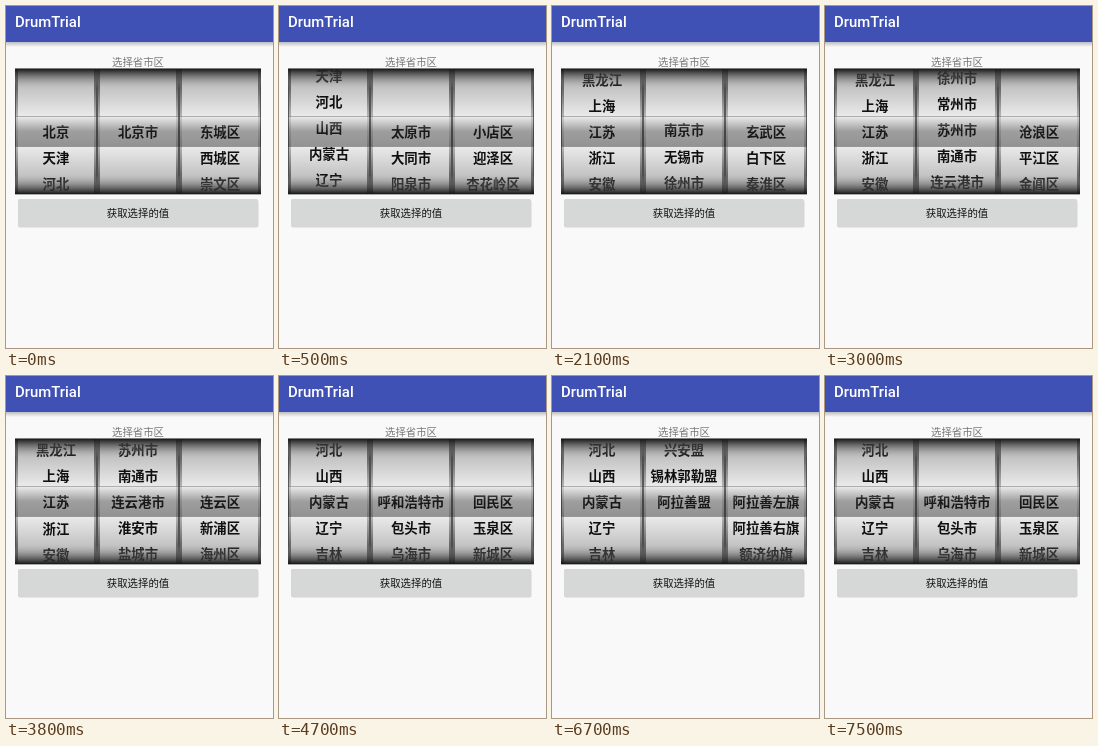
An HTML page that plays this animation: 267 by 342 pixels, repeating every 8000 ms.

```html
<!DOCTYPE html>
<html lang="zh-CN">
<head>
<meta charset="utf-8">
<style>
  html, body { margin: 0; width: 100%; height: 100%; overflow: hidden; background: #f9f9f9; }
  #stage { display: block; width: 267px; height: 342px; }
  text { font-family: Roboto, "Noto Sans CJK SC", "Noto Sans CJK", sans-serif; font-size: 10.4px; text-anchor: middle; }
  .title { font-size: 14.9px; font-weight: 500; fill: #fff; text-anchor: start; }
  .item { font-size: 13.4px; font-weight: 700; fill: #101010; }
</style>
</head>
<body>
<svg id="stage" viewBox="0 0 267 342">
  <defs>
    <linearGradient id="rim" x2="0" y2="1">
      <stop stop-color="#333"/><stop offset=".5" stop-color="#ddd"/><stop offset="1" stop-color="#333"/>
    </linearGradient>
    <linearGradient id="drum" x2="0" y2="1">
      <stop stop-color="#aaa"/><stop offset=".5" stop-color="#fff"/><stop offset="1" stop-color="#aaa"/>
    </linearGradient>
    <linearGradient id="band" x2="0" y2="1">
      <stop stop-color="#eee"/><stop offset=".5" stop-color="#222"/><stop offset="1" stop-color="#222"/>
    </linearGradient>
    <linearGradient id="shade" x2="0" y2="1">
      <stop stop-color="#111"/><stop offset=".5" stop-color="#aaa" stop-opacity="0"/>
    </linearGradient>
    <linearGradient id="drop" x2="0" y2="1">
      <stop stop-opacity=".24"/><stop offset="1" stop-opacity="0"/>
    </linearGradient>
  </defs>

  <rect width="267" height="342" fill="#f9f9f9"/>
  <rect y="36" width="267" height="5" fill="url(#drop)"/>
  <rect width="267" height="36" fill="#3f51b5"/>
  <text class="title" x="9" y="21">DrumTrial</text>
  <text x="132" y="59.5" fill="#777">选择省市区</text>

  <g id="wheels"></g>

  <rect x="12" y="194" width="240.5" height="27.5" rx="2" fill="#000" opacity=".14"/>
  <rect x="12" y="193" width="240" height="27" rx="1.5" fill="#d6d7d7"/>
  <text x="132" y="210.5" fill="#111">获取选择的值</text>
</svg>

<script>
const LOOP = 8000, PITCH = 26.2, WIDTH = 82, HEIGHT = 126;

const provinces = '北京 天津 河北 山西 内蒙古 辽宁 吉林 黑龙江 上海 江苏 浙江 安徽';
const jiangsu = '南京市 无锡市 徐州市 常州市 苏州市 南通市 连云港市 淮安市 盐城市';
const neimenggu = '呼和浩特市 包头市 乌海市 赤峰市 通辽市 鄂尔多斯市 呼伦贝尔市 ' +
  '巴彦淖尔市 乌兰察布市 兴安盟 锡林郭勒盟 阿拉善盟';

// Start time, then per wheel: items, selected index, vertical offset
const poses = [
  [0, [provinces, 0], ['北京市', 0], ['东城区 西城区 崇文区', 0]],
  [500, [provinces, 3, -4], ['太原市 大同市 阳泉市', 0], ['小店区 迎泽区 杏花岭区', 0]],
  [1300, [provinces, 8, -8], ['上海市', 0], ['黄浦区 卢湾区 徐汇区', 0]],
  [2100, [provinces, 9], [jiangsu, 0, -1.5], ['玄武区 白下区 秦淮区', 0]],
  [3000, [provinces, 9], [jiangsu, 4, -2], ['沧浪区 平江区 金阊区', 0]],
  [3800, [provinces, 9, .5], [jiangsu, 6], ['连云区 新浦区 海州区', 0]],
  [4700, [provinces, 4], [neimenggu, 0], ['回民区 玉泉区 新城区', 0]],
  [5800, [provinces, 4], [neimenggu, 3], ['红山区 元宝山区 松山区', 0]],
  [6700, [provinces, 4], [neimenggu, 11], ['阿拉善左旗 阿拉善右旗 额济纳旗', 0]],
  [7500, [provinces, 4], [neimenggu, 0], ['回民区 玉泉区 新城区', 0]]
];

const wheels = document.getElementById('wheels');
wheels.innerHTML = [0, 1, 2].map(i => `
  <svg x="${9 + i * WIDTH}" y="62.4" width="${WIDTH}" height="${HEIGHT}">
    <rect x=".37" y=".37" width="${WIDTH - .74}" height="${HEIGHT - .74}" fill="url(#rim)" stroke="#333" stroke-width=".74"/>
    <rect x="3" y=".74" width="${WIDTH - 6}" height="${HEIGHT - 1.5}" fill="url(#drum)"/>
    <g class="items"></g>
    <rect x=".37" y="48" width="${WIDTH - .74}" height="30" fill="url(#band)" fill-opacity=".44"
      stroke="#333" stroke-opacity=".44" stroke-width=".74"/>
    <rect width="${WIDTH}" height="39" fill="url(#shade)"/>
    <rect width="${WIDTH}" height="39" fill="url(#shade)" transform="translate(0 ${HEIGHT}) scale(1 -1)"/>
  </svg>`).join('');
const slots = wheels.querySelectorAll('.items');

function showItems(slot, [names, selected, offset = 0]) {
  slot.innerHTML = names.split(' ').map((name, i) => {
    const y = 68.6 + (i - selected) * PITCH + offset;
    return y > 0 && y < HEIGHT + 14 ? `<text class="item" x="41" y="${y}">${name}</text>` : '';
  }).join('');
}

let shown;
function draw() {
  const t = performance.now() % LOOP;
  const pose = poses.findLast(p => p[0] <= t);
  if (pose !== shown) {
    shown = pose;
    slots.forEach((slot, i) => showItems(slot, pose[i + 1]));
  }
  requestAnimationFrame(draw);
}
draw();
</script>
</body>
</html>
```
